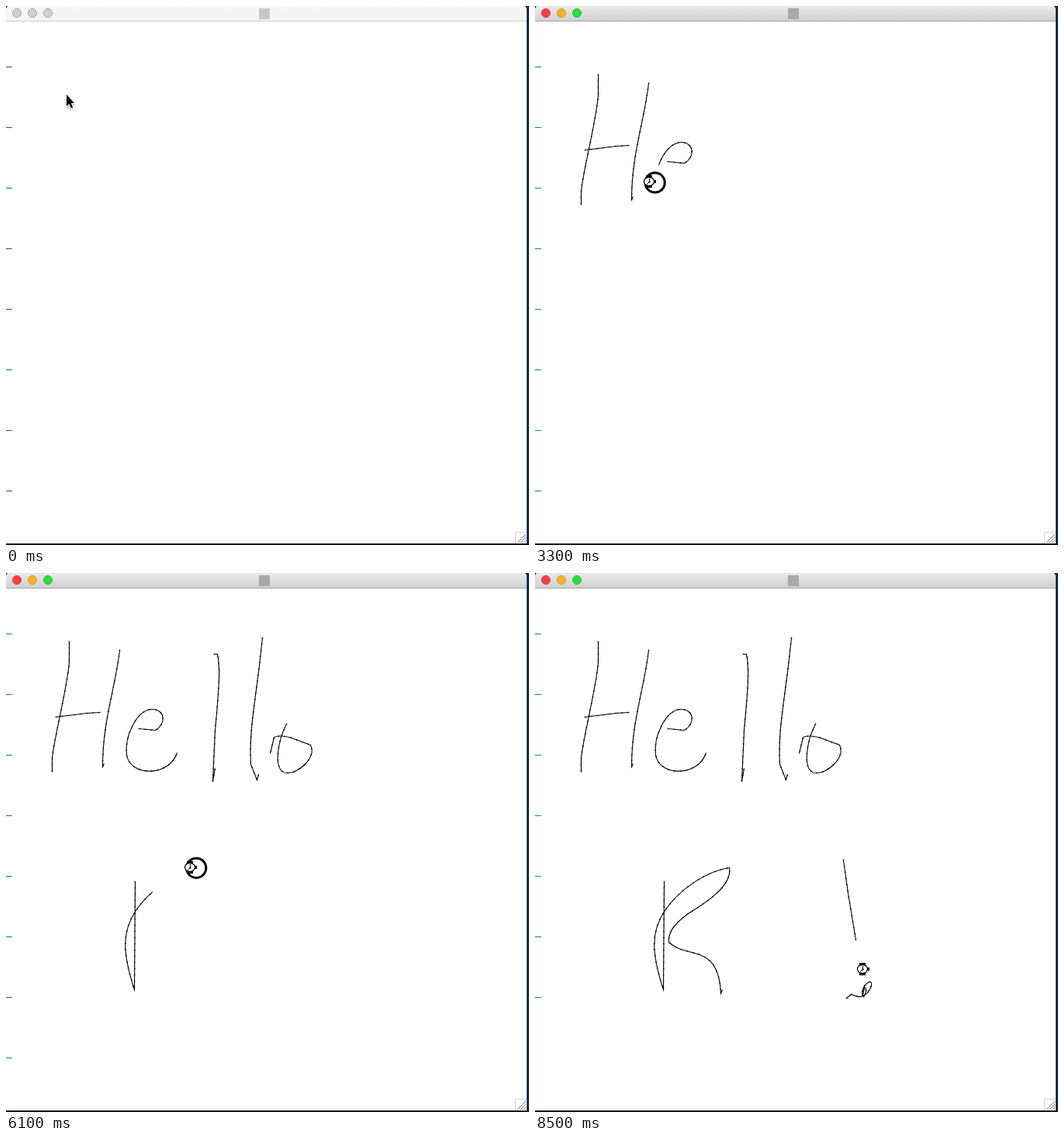
Recreate the animation shown at these times as an HTML page with a canvas. Size 674 px wide and 694 px high, loop 8.7 s.

```html
<!DOCTYPE html>
<html>
<head>
<meta charset="utf-8">
<title>Handwriting</title>
<style>
html, body { margin: 0; width: 100%; height: 100%; overflow: hidden; background: #fff; }
canvas { display: block; }
</style>
</head>
<body>
<canvas id="stage" width="674" height="694"></canvas>
<script>
const g = document.getElementById('stage').getContext('2d');
const LOOP = 8700, STEP = 100, LAST = 8500;
const LAG = 80;      // ink trails the pointer by this many ms
const ACTIVE = 500;  // the window gets focus
const DOT_GAP = 8;

function stroke(start, duration, d) {
  const curve = document.createElementNS('http://www.w3.org/2000/svg', 'path');
  curve.setAttribute('d', d);
  const total = curve.getTotalLength();
  const at = dist => {
    const p = curve.getPointAtLength(dist);
    return [p.x, p.y];
  };
  const dots = Array.from({ length: Math.floor(total / DOT_GAP) + 1 }, (_, i) => at(i * DOT_GAP));
  return { start, end: start + duration, total, at, dots, shape: new Path2D(d) };
}

const strokes = [
  // Hello
  stroke(1500, 450, 'M81,88 V114 C79,146 59,222 59,240 V256'),
  stroke(2200, 180, 'M64,185 L104,180 L121,179'),
  stroke(2500, 260, 'M146,99 C140,150 124,190 124,249 L126,245'),
  stroke(2873, 733, 'M171,200 L192,202 C207,193 204,175 188,175 C168,175 152,210 155,234 C160,262 210,262 220,231'),
  stroke(3780, 300, 'M268,104 H272 C276,120 274,150 269,202 L266,268 L269,251'),
  stroke(4250, 270, 'M330,83 L325,127 C318,180 313,210 315,246 L323,266 L325,259'),
  stroke(4680, 320, 'M361,194 C350,215 342,257 362,257 C375,258 400,238 392,221 L365,211 Q350,208 345,211 L340,232'),
  // K!
  stroke(5680, 720, 'M166,397 L165,536 C150,490 148,462 167,434 C187,405 222,383 250,379 C254,402 220,424 197,438 C178,452 171,462 172,475 C195,497 236,475 239,541 L241,536'),
  stroke(6768, 210, 'M397,369 L403,412 L413,472'),
  stroke(7500, 800, 'M401,547 L407,542 Q420,549 428,540 C434,532 435,525 430,526 C420,531 420,545 423,545 C427,540 427,533 424,533 L422,544')
];

const clamp = u => Math.min(1, Math.max(0, u));
const inkLength = (s, t) => s.total * clamp((t - s.start) / (s.end - s.start));

// Pointer stops between strokes: time and place
const stops = [
  [0, [78, 114]], [400, [78, 114]], [1200, [81, 174]],
  [2100, [61, 219]], [5300, [47, 481]], [LAST, [430, 511]],
  ...strokes.flatMap(s => [[s.start, s.at(0)], [s.end, s.at(s.total)]])
].sort((a, b) => a[0] - b[0]);

function pointer(t) {
  const s = strokes.find(s => t >= s.start && t < s.end);
  if (s) return { pos: s.at(inkLength(s, t)), down: true };
  const i = stops.findIndex(p => p[0] >= t);
  const [t1, b] = stops[i], [t0, a] = stops[Math.max(0, i - 1)];
  const u = t1 > t0 ? (t - t0) / (t1 - t0) : 1;
  return { pos: a.map((v, c) => v + (b[c] - v) * u), down: false };
}

function rect(color, x, y, w, h) {
  g.fillStyle = color;
  g.fillRect(x, y, w, h);
}

function circle(x, y, r, fill, line, width) {
  g.beginPath();
  g.arc(x, y, r, 0, 7);
  if (fill) { g.fillStyle = fill; g.fill(); }
  g.strokeStyle = line;
  g.lineWidth = width;
  g.stroke();
}

function roundTop(fill, h) {
  g.fillStyle = fill;
  g.beginPath();
  g.roundRect(0, -1, 671, h + 1, [6, 6, 0, 0]);
  g.fill();
}

function path(...pts) {
  g.beginPath();
  pts.forEach(p => g.lineTo(p[0], p[1]));
}

function drawWindow(active) {
  rect('#1c2a4a', 0, 0, 674, 694);
  rect('#10131f', 0, 692, 674, 2);
  roundTop('#fff', 692);

  const bar = g.createLinearGradient(0, 0, 0, 19);
  bar.addColorStop(0, active ? '#e9e9e9' : '#f6f6f6');
  bar.addColorStop(1, active ? '#d0d0d0' : '#f4f4f4');
  roundTop(bar, 19);
  rect(active ? '#a8a8a8' : '#cecece', 0, 19, 671, 1);

  const lights = active
    ? [['#f23f48', '#d5373f'], ['#f6b22e', '#d99b2b'], ['#2edb40', '#29bb38']]
    : Array(3).fill(['#d0d0d0', '#a2a2a2']);
  lights.forEach(([fill, line], i) => circle(14 + 20 * i, 9, 5.5, fill, line, 1));
  rect(active ? '#a9a9a9' : '#c8c8c8', 326, 3, 14, 14);

  rect('#d4d4d4', 656, 677, 15, 1);
  rect('#d4d4d4', 656, 677, 1, 15);
  g.strokeStyle = '#777';
  g.lineWidth = 1;
  for (let d = 0; d < 12; d += 4) {
    path([659 + d, 691], [670, 680 + d]);
    g.stroke();
  }
}

function drawTicks(t) {
  const count = t >= LAST ? 7 : 8;
  for (let i = 1; i <= count; i++) rect(t < ACTIVE ? '#008800' : '#00a000', 0, 78 * i, 8, 1);
}

function drawStroke(s, t) {
  const dist = inkLength(s, t - LAG);
  if (!dist) return;
  g.save();
  g.translate(0.5, 0.5);
  g.strokeStyle = '#000';
  g.lineWidth = 1.1;
  g.setLineDash([dist, s.total + 1]);
  g.stroke(s.shape);
  s.dots.forEach(([x, y], i) => {
    if (i * DOT_GAP <= dist) rect('#000', x - 0.75, y - 0.75, 1.5, 1.5);
  });
  g.restore();
}

function drawArrow(x, y) {
  g.save();
  g.translate(x, y);
  path([0, 0], [0, 15], [3.4, 12], [5.8, 17.4], [8.2, 16.4], [5.9, 11], [10, 11]);
  g.closePath();
  g.shadowColor = 'rgba(0,0,0,.4)';
  g.shadowBlur = 3;
  g.shadowOffsetY = 1;
  g.strokeStyle = '#fff';
  g.lineWidth = 2;
  g.stroke();
  g.shadowColor = 'transparent';
  g.fillStyle = '#000';
  g.fill();
  g.restore();
}

function drawWatch(x, y) {
  g.save();
  g.translate(Math.round(x) - 8, Math.round(y) - 1);
  rect('#000', -4, -8, 8, 16);
  rect('#000', 6, -2, 3, 4);
  g.beginPath();
  g.ellipse(0, 0, 6.5, 5.5, 0, 0, 7);
  g.fillStyle = '#fff';
  g.fill();
  g.strokeStyle = '#000';
  g.lineWidth = 1.3;
  g.stroke();
  g.lineWidth = 1;
  path([0.5, -4], [0.5, 0.5], [-3, 3.5]);
  g.stroke();
  rect('#000', -0.5, -0.5, 2, 2);
  g.restore();
}

function draw(t) {
  const active = t >= ACTIVE;
  drawWindow(active);
  drawTicks(t);
  strokes.forEach(s => drawStroke(s, t));
  const { pos: [x, y], down } = pointer(t);
  if (down) circle(x, y, 12.6, null, '#000', 3);
  (active ? drawWatch : drawArrow)(x, y);
}

const began = performance.now();
function tick() {
  const t = (performance.now() - began) % LOOP;
  draw(Math.min(LAST, Math.floor(t / STEP) * STEP));
  requestAnimationFrame(tick);
}
tick();
</script>
</body>
</html>
```
